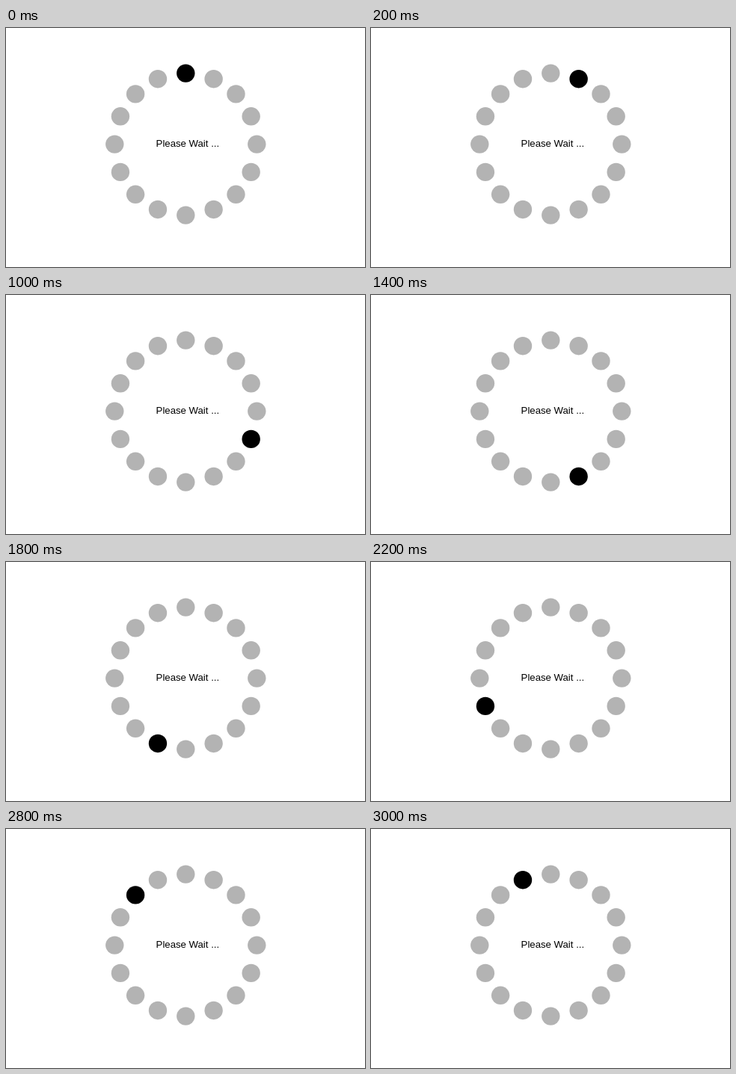
An HTML page that plays this animation: 480x320 px, repeating every 3.2 s.

```html
<!DOCTYPE html>
<html lang="en">
<head>
<meta charset="utf-8">
<title>Please Wait</title>
<style>
  html, body { margin: 0; width: 100%; height: 100%; overflow: hidden; background: #fff; }
  svg { display: block; }
  circle { fill: #b3b3b3; }
  circle.on { fill: #000; }
  text { font: 13.2px "Liberation Sans", Arial, sans-serif; }
</style>
</head>
<body>
<svg width="480" height="320" viewBox="0 0 480 320">
  <g id="ring"></g>
  <text x="200.6" y="159">Please Wait ...</text>
</svg>
<script>
const COUNT = 16, STEP = 200;
const CX = 240.3, CY = 155.6, RADIUS = 95, DOT = 12.2;
const ring = document.getElementById("ring");

function makeDot(i) {
  const turn = i / COUNT * 2 * Math.PI;
  // The spacing is slightly wider beside the four axis dots.
  const angle = turn + 0.011 * Math.sin(4 * turn);
  const dot = document.createElementNS("http://www.w3.org/2000/svg", "circle");
  dot.setAttribute("cx", CX + RADIUS * Math.sin(angle));
  dot.setAttribute("cy", CY - RADIUS * Math.cos(angle));
  dot.setAttribute("r", DOT);
  return ring.appendChild(dot);
}

const dots = Array.from({ length: COUNT }, (_, i) => makeDot(i));
const start = performance.now();

function draw() {
  const active = Math.floor((performance.now() - start) / STEP) % COUNT;
  dots.forEach((dot, i) => dot.classList.toggle("on", i === active));
  requestAnimationFrame(draw);
}
draw();
</script>
</body>
</html>
```
